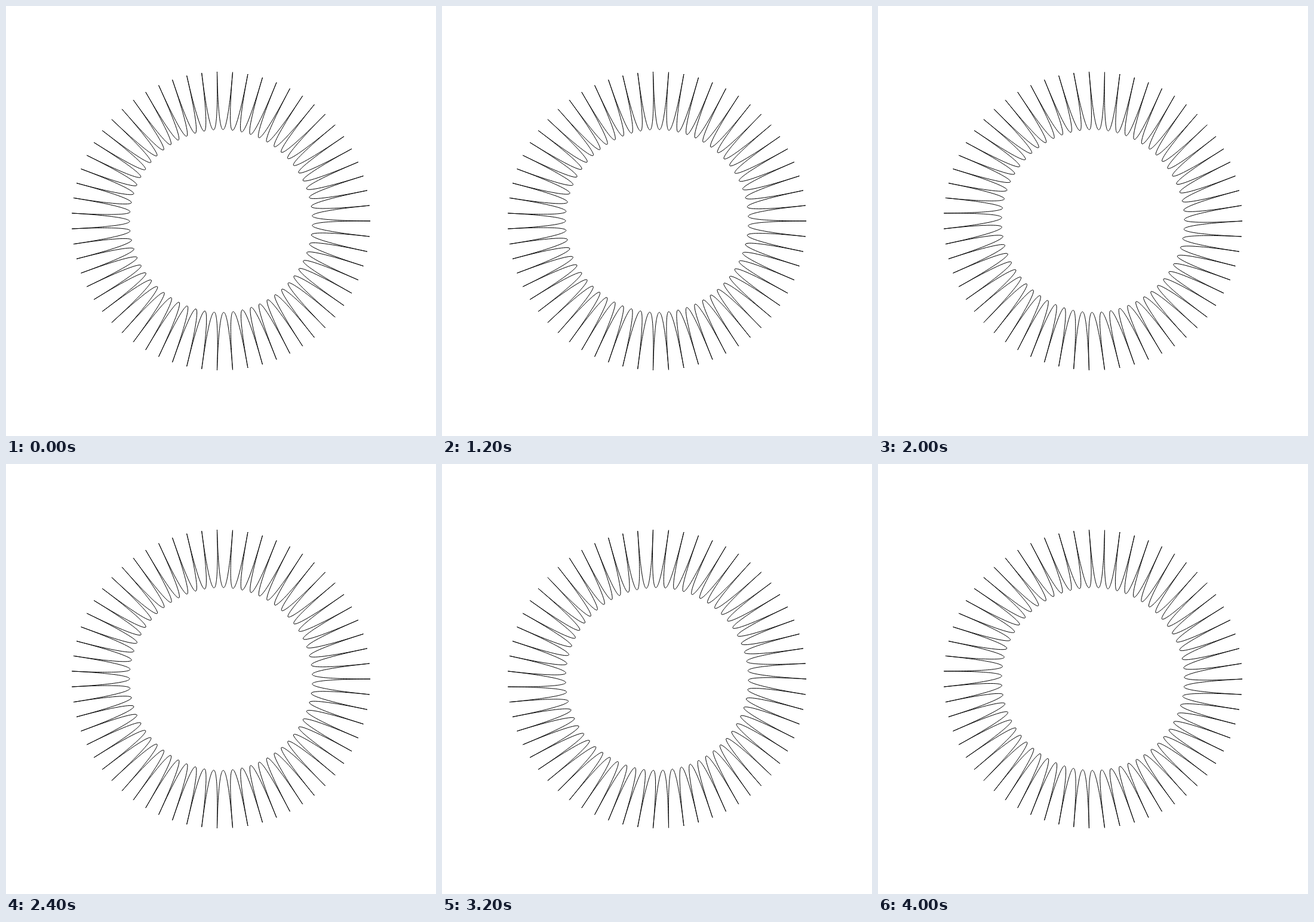
Animation of 720x720 px, one loop 4100 ms. Source, as an HTML page with a canvas:

```html
<!DOCTYPE html>
<html lang="en">
<head>
<meta charset="utf-8">
<title>Swaying ring</title>
<style>
  html, body { margin: 0; width: 100%; height: 100%; overflow: hidden; background: #fff; }
  canvas { display: block; }
</style>
</head>
<body>
<canvas id="stage" width="720" height="720"></canvas>
<script>
const ctx = document.getElementById('stage').getContext('2d');

const LOOP = 4100, STEP = 100;
const SPIKES = 63, RADIUS = 250, INNER = 0.484;
const SWAY = 0.0716, PERIOD = 2450, PHASE = 0.087;
const KAPPA = 0.5523;

// Point on a circle made of four cubic arcs, evenly spaced in the curve parameter.
function ringPoint(i) {
  const u = i * 4 / SPIKES;
  const quarter = Math.floor(u), t = u - quarter, s = 1 - t;
  const x = s * s * s + 3 * s * s * t + 3 * s * t * t * KAPPA;
  const y = 3 * s * s * t * KAPPA + 3 * s * t * t + t * t * t;
  return rotate([x * RADIUS, y * RADIUS], quarter * Math.PI / 2);
}

function rotate([x, y], angle, scale = 1) {
  const c = Math.cos(angle) * scale, s = Math.sin(angle) * scale;
  return [x * c - y * s, x * s + y * c];
}

const tips = Array.from({ length: SPIKES }, (_, i) => ringPoint(i));

function draw(time) {
  const sway = -SWAY * Math.sin(2 * Math.PI * time / PERIOD + PHASE);
  const handles = tips.map(p => rotate(p, sway, INNER));

  ctx.setTransform(1, 0, 0, 1, 0, 0);
  ctx.fillStyle = '#fff';
  ctx.fillRect(0, 0, 720, 720);
  ctx.translate(360, 360);
  ctx.strokeStyle = '#000';
  ctx.lineWidth = 1;
  ctx.lineJoin = 'bevel';
  ctx.beginPath();
  ctx.moveTo(...tips[0]);
  for (let i = 0; i < SPIKES; i++) {
    const next = (i + 1) % SPIKES;
    ctx.bezierCurveTo(...handles[i], ...handles[next], ...tips[next]);
  }
  ctx.closePath();
  ctx.stroke();
}

const start = performance.now();
function tick() {
  const time = (performance.now() - start) % LOOP;
  draw(Math.floor(time / STEP) * STEP);
  requestAnimationFrame(tick);
}
tick();
</script>
</body>
</html>
```
